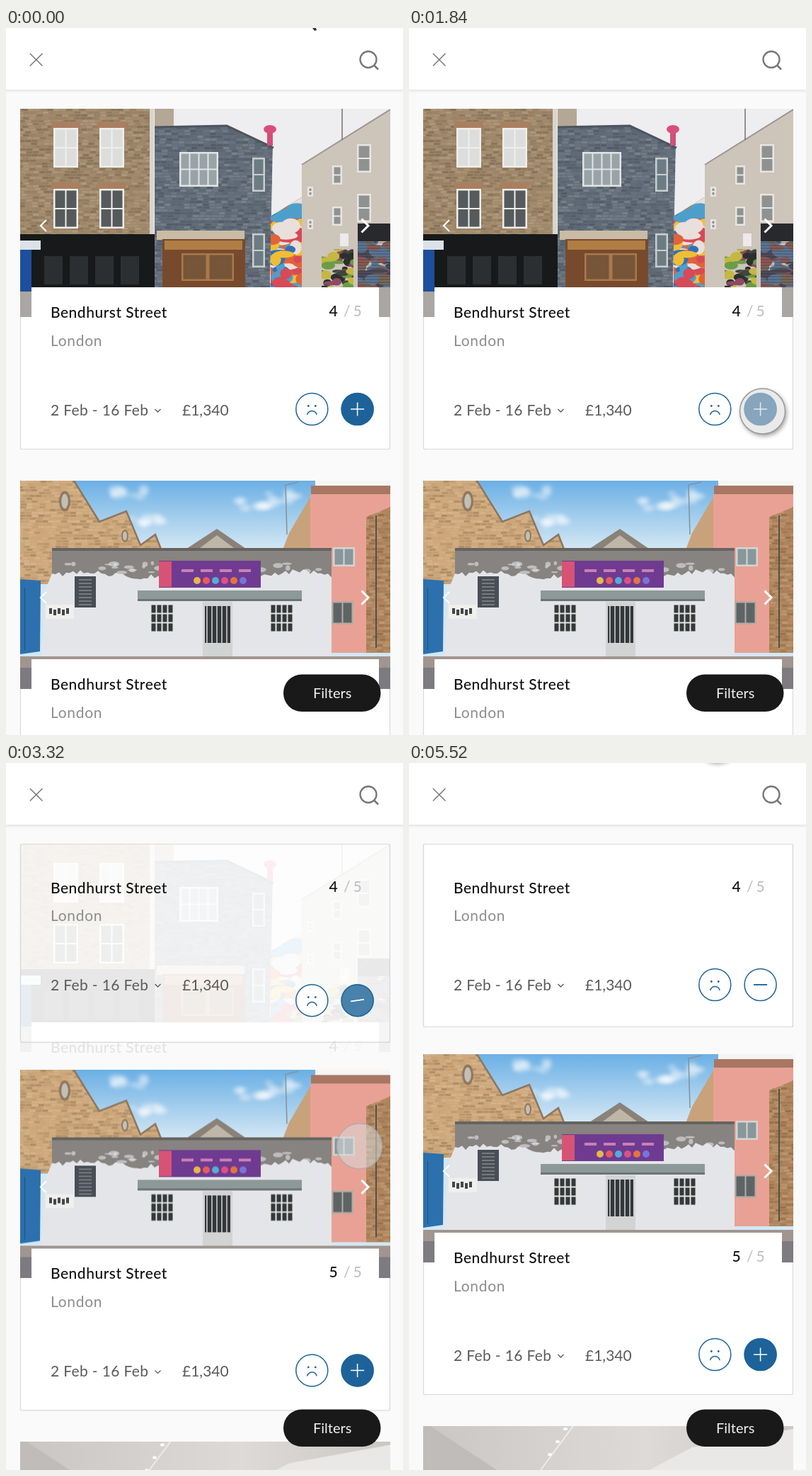
Animation, 561 px wide and 998 px high, one loop 5800 ms. Source, as an HTML page with a canvas:

```html
<!DOCTYPE html>
<html lang="en">
<head>
<meta charset="utf-8">
<title>Space listings</title>
<style>
html, body { margin: 0; width: 100%; height: 100%; overflow: hidden; background: #fafafa; }
canvas { display: block; width: 100vw; height: 100vh; }
</style>
</head>
<body>
<canvas id="stage" width="561" height="998"></canvas>
<script>
const LOOP = 5800, STEP = 40, W = 561, H = 998;
const LEFT = 20, WIDTH = 523, PHOTO_H = 294, CARD_H = 481, PITCH = 525, TOP = 114;
const PAGE = '#fafafa', EDGE = '#d9d9d9', BLUE = '#1d6399';
const DARK = '#111', GREY = '#8d8d8d', PALE = '#bdbdbd', TEXT = '#5a5a5a';
const PLACE = 'Bendhurst Street';
const ctx = document.getElementById('stage').getContext('2d');

const clamp = v => Math.max(0, Math.min(1, v));
const mix = (a, b, p) => a + (b - a) * p;
const span = (t, from, to) => clamp((t - from) / (to - from));
const easeOut = (p, n) => 1 - (1 - p) ** n;

function random(seed) {
  return () => (seed = (seed * 16807) % 2147483647) / 2147483647;
}

// ---------- drawing helpers ----------
function box(g, color, x, y, w, h) {
  g.fillStyle = color;
  g.fillRect(x, y, w, h);
}

function trace(g, points) {
  g.beginPath();
  for (let i = 0; i < points.length; i += 2) g.lineTo(points[i], points[i + 1]);
}

function poly(g, color, ...points) {
  trace(g, points);
  g.fillStyle = color;
  g.fill();
}

function line(g, color, width, ...points) {
  trace(g, points);
  g.strokeStyle = color;
  g.lineWidth = width;
  g.stroke();
}

function oval(g, color, x, y, rx, ry = rx) {
  g.beginPath();
  g.ellipse(x, y, rx, ry, 0, 0, Math.PI * 2);
  g.fillStyle = color;
  g.fill();
}

function ring(g, color, width, x, y, r) {
  g.beginPath();
  g.arc(x, y, r, 0, Math.PI * 2);
  g.strokeStyle = color;
  g.lineWidth = width;
  g.stroke();
}

// Fills a shape, then shades it with random bricks.
function brickwork(g, color, ...points) {
  const rnd = random(points.length * 97), [x0, y0] = points;
  g.save();
  trace(g, points);
  g.clip();
  g.fillStyle = color;
  g.fill();
  for (let y = y0 - 40; y < y0 + 260; y += 4)
    for (let x = x0 - rnd() * 9; x < x0 + 230; x += 9) {
      const tone = rnd() < 0.5 ? '0,0,0' : '255,245,225';
      box(g, `rgba(${tone},${rnd() * 0.16})`, x, y, 8, 3);
    }
  g.restore();
}

// Random splashes of paint inside a shape.
function mural(g, seed, colors, size, ...points) {
  const rnd = random(seed), [x0, y0] = points;
  g.save();
  trace(g, points);
  g.clip();
  for (let i = 0; i < 160; i++)
    oval(g, colors[i % colors.length], x0 + rnd() * 60, y0 - 30 + rnd() * 140,
      size * (0.4 + rnd()), size * (0.3 + rnd() / 2));
  g.restore();
}

function pane(g, frame, glass, x, y, w, h, cols, rows) {
  box(g, frame, x, y, w, h);
  const cw = (w - 3) / cols, rh = (h - 3) / rows;
  for (let c = 0; c < cols; c++)
    for (let r = 0; r < rows; r++)
      box(g, glass, x + 2.5 + c * cw, y + 2.5 + r * rh, cw - 2, rh - 2);
}

// Cached picture, drawn in stage coordinates; the caption panel cuts into its foot.
function picture(top, draw) {
  const c = document.createElement('canvas');
  c.width = WIDTH;
  c.height = PHOTO_H;
  const g = c.getContext('2d');
  g.translate(-LEFT, -top);
  draw(g);
  box(g, '#fff', 36, top + 252, 491, 60);
  return c;
}

// ---------- pictures ----------
const terrace = picture(TOP, g => {
  box(g, '#eeedef', LEFT, TOP, WIDTH, PHOTO_H);
  box(g, '#aaa6a3', LEFT, 360, WIDTH, 48);

  // brick house and dark shopfront
  brickwork(g, '#9f8769', 20, 114, 205, 114, 205, 300, 20, 300);
  box(g, '#d9d5cd', 203, 114, 6, 190);
  for (const x of [67, 132])
    for (const [y, glass] of [[141, '#dcdedd'], [227, '#555a5c']]) {
      box(g, '#a97f60', x - 3, y - 9, 41, 9);
      pane(g, '#f0eeea', glass, x, y, 35, 56, 2, 2);
    }
  box(g, '#17191a', 20, 291, 190, 75);
  for (let i = 0; i < 4; i++) box(g, '#2b2f31', 54 + i * 36, 322, 26, 40);
  box(g, '#1d4f9c', 20, 308, 16, 64);
  box(g, '#dbe2e8', 20, 300, 29, 13);

  // painted corner building
  box(g, '#b5a796', 210, 114, 27, 30);
  brickwork(g, '#616c79', 210, 140, 312, 138, 377, 169, 373, 366, 210, 366);
  line(g, '#4b545e', 3, 210, 140, 312, 138, 378, 169);
  pane(g, '#e2e4e3', '#98a3a8', 245, 175, 55, 49, 4, 2);
  for (const y of [183, 290]) pane(g, '#c9cecf', '#6d7b83', 348, y, 18, 48, 1, 2);
  box(g, '#cabba6', 213, 286, 124, 13);
  box(g, '#774a2d', 221, 298, 117, 68);
  box(g, '#b07d44', 224, 300, 110, 13);
  for (const x of [248, 285]) pane(g, '#a9794c', '#765538', x, 318, 37, 39, 1, 1);
  box(g, '#d0507a', 369, 144, 8, 22);
  oval(g, '#d94f79', 373, 143, 9, 6);

  // lane with murals
  poly(g, '#cdc4ba', 418, 193, 543, 115, 543, 366, 418, 366);
  line(g, '#9c958f', 2, 418, 193, 543, 115);
  line(g, '#77716d', 1.5, 475, 114, 475, 158);
  for (let i = 0; i < 3; i++)
    for (let row = 0; row < 2; row++)
      pane(g, '#e8e6e2', '#8e9391', 426 + i * 35, 224 - i * 30 + row * (46 + i * 12), 8 + i * 6, 14 + i * 13, 1, 2);
  mural(g, 5, ['#4d9fcb', '#f0be35', '#e0643a', '#e9dfdb', '#356fb4', '#d74a57'], 14,
    374, 266, 418, 239, 418, 366, 374, 366);
  mural(g, 11, ['#3f453f', '#6c9c45', '#2c302c', '#c4b83f', '#8d4a62'], 8,
    446, 312, 491, 312, 491, 366, 446, 366);
  mural(g, 17, ['#4e4a59', '#5b7593', '#8a5a55', '#75695a'], 11,
    497, 301, 543, 301, 543, 366, 497, 366);
  for (let y = 303; y < 366; y += 4) line(g, 'rgba(25,25,35,.4)', 1, 497, y, 543, y);
  box(g, '#28292c', 497, 276, 46, 25);
  box(g, '#eceaea', 472, 290, 12, 18);
});

const shop = picture(TOP + PITCH, g => {
  const sky = g.createLinearGradient(0, 639, 0, 735);
  sky.addColorStop(0, '#6bb0e5');
  sky.addColorStop(1, '#d3e7f4');
  box(g, sky, LEFT, 639, WIDTH, PHOTO_H);
  const rnd = random(12);
  g.save();
  g.filter = 'blur(3px)';
  for (let i = 0; i < 30; i++) {
    const x = [175, 200, 346, 384][i % 4], y = [657, 696, 671, 662][i % 4];
    oval(g, 'rgba(255,255,255,.5)', x + (rnd() - 0.5) * 44, y + (rnd() - 0.5) * 14, 5 + rnd() * 9, 2 + rnd() * 4);
  }
  g.restore();

  // brick gables
  const ridge = [96, 639, 132, 697, 170, 682, 190, 730, 211, 715, 220, 738];
  brickwork(g, '#cda77a', 20, 639, ...ridge, 65, 785, 20, 785);
  line(g, '#8e755f', 2.5, ...ridge);
  for (const [x, y, r] of [[83, 668, 8], [168, 717, 5]]) {
    oval(g, '#91785f', x, y, r, r * 1.8);
    oval(g, '#c2bfb6', x, y, r * 0.6, r * 1.3);
  }
  poly(g, '#8a8278', 252, 737, 298, 707, 342, 737);
  poly(g, '#bfb6a8', 274, 734, 298, 716, 322, 734);

  // pink house
  line(g, '#859099', 1.5, 413, 641, 395, 645, 397, 715);
  poly(g, '#c8a27a', 390, 739, 400, 713, 434, 655, 434, 739);
  poly(g, '#e9a195', 430, 658, 543, 656, 543, 882, 458, 882, 430, 738);
  box(g, '#f7f4f2', 437, 639, 106, 7);
  box(g, '#a87662', 431, 646, 112, 12);
  brickwork(g, '#b0865c', 509, 690, 543, 676, 543, 882, 509, 882);
  line(g, '#55504c', 2, 523, 688, 523, 875);
  pane(g, '#d5d5d3', '#87979b', 462, 733, 31, 27, 2, 1);
  pane(g, '#b8aaa4', '#5d6465', 460, 809, 31, 33, 2, 1);

  // shop wall with flaking paint
  box(g, '#868380', 65, 734, 395, 50);
  box(g, '#656361', 65, 734, 395, 4);
  const flakes = [];
  for (let x = 65; x <= 460; x += 5) flakes.push(x, 768 + Math.sin(x / 24) * 4 + rnd() * 7);
  poly(g, '#e4e5e9', 50, 888, 56, 792, ...flakes, 460, 888);
  for (let i = 0; i < 40; i++)
    oval(g, 'rgba(228,228,231,.6)', 72 + rnd() * 380, 755 + rnd() * 14, 2 + rnd() * 6, 1 + rnd() * 3);
  poly(g, '#2c70ae', 20, 778, 49, 780, 48, 880, 20, 884);
  box(g, '#204f7e', 26, 790, 1, 88);

  // banner and notices
  box(g, '#6e3b91', 216, 752, 144, 38);
  box(g, '#d75375', 216, 753, 18, 36);
  ['#e8b74b', '#e95a62', '#53afd1', '#df4f87', '#e4743e', '#7b73d8'].forEach((c, i) =>
    oval(g, c, 270 + i * 13, 780, 5));
  for (let i = 0; i < 4; i++) box(g, '#cb7fb4', 248 + i * 27, 764, 17, 4);
  box(g, '#484d56', 97, 774, 30, 44);
  for (let y = 779; y < 815; y += 5) line(g, '#a4a9ad', 1, 103, y, 121, y);
  box(g, '#f0efeb', 56, 814, 40, 20);
  for (let i = 0; i < 5; i++) box(g, '#42474a', 61 + i * 6, 819 + (i % 2) * 2, 4, 8);

  // canopy, windows and door
  box(g, '#8d9998', 186, 794, 232, 14);
  box(g, '#6a7574', 186, 806, 232, 3);
  for (const x of [203, 372]) pane(g, '#e4e5e2', '#34393b', x, 812, 35, 42, 4, 3);
  box(g, '#d2d3d3', 278, 810, 42, 78);
  box(g, '#33373a', 281, 816, 36, 52);
  for (let x = 284; x < 318; x += 7) line(g, '#d9dad9', 1.5, x, 816, x, 869);

  box(g, '#a0958f', LEFT, 887, WIDTH, 16);
  box(g, '#7d7b80', LEFT, 903, WIDTH, 30);
});

const room = picture(TOP + PITCH, g => {
  const y = TOP + PITCH, wall = g.createLinearGradient(LEFT, 0, LEFT + WIDTH, 0);
  wall.addColorStop(0, '#c9c6c3');
  wall.addColorStop(0.6, '#dddad7');
  wall.addColorStop(1, '#cac7c4');
  box(g, wall, LEFT, y, WIDTH, PHOTO_H);
  poly(g, '#bfbcb9', 20, y, 30, y, 124, y + 62, 20, y + 62);
  line(g, '#efedeb', 2, 232, y, 186, y + 62);
  poly(g, '#eae8e6', 340, y + 62, 400, y + 30, 543, y + 4, 543, y + 62);
  for (let i = 0; i < 3; i++) oval(g, '#fff', 221 - i * 11, y + 4 + i * 18, 3, 2);
});

// ---------- interface ----------
function text(s, x, y, color, size = 21, spacing = 0, weight = 400) {
  ctx.font = `${weight} ${size}px Lato, "Open Sans", sans-serif`;
  ctx.letterSpacing = spacing + 'px';
  ctx.fillStyle = color;
  ctx.fillText(s, x, y);
}

function faded(alpha, draw) {
  if (alpha <= 0) return;
  ctx.save();
  ctx.globalAlpha = alpha;
  draw();
  ctx.restore();
}

function frame(top, height, fill) {
  ctx.beginPath();
  ctx.roundRect(LEFT + 0.5, top + 0.5, WIDTH - 1, height - 1, 2);
  ctx.fillStyle = fill;
  ctx.fill();
  ctx.strokeStyle = EDGE;
  ctx.lineWidth = 1.2;
  ctx.stroke();
}

function heading(n, title, city) {
  text(PLACE, 63, title, DARK, 21, 0.5, 500);
  text(n, 456.5, title - 2, DARK, 21, 0, 500);
  text('/', 477, title - 2, PALE);
  text('5', 490.5, title - 2, PALE);
  text('London', 63, city, GREY, 21, 0.7);
}

function booking(y) {
  text('2 Feb - 16 Feb', 63, y, TEXT, 21, 0.35);
  text('£1,340', 249, y, TEXT);
  line(ctx, TEXT, 1.3, 210.5, y - 9, 214.5, y - 5, 218.5, y - 9);
}

function chevron(x, y, dir, size, width) {
  line(ctx, '#fff', width, x - dir * size, y - size, x, y, x - dir * size, y + size);
}

function photoCard(image, top, n) {
  ctx.drawImage(image, LEFT, top);
  chevron(49, top + 165, -1, 8, 2.2);
  chevron(512, top + 165, 1, 9.5, 3);
  heading(n, top + 294.5, top + 335);
  booking(top + 433);
}

function sadFace(y) {
  const x = 432.3;
  oval(ctx, '#fff', x, y, 22.5);
  ring(ctx, BLUE, 1.5, x, y, 22.5);
  for (const side of [-5, 5]) oval(ctx, BLUE, x + side, y - 4.5, 1.4);
  ctx.beginPath();
  ctx.arc(x, y + 9.5, 7, Math.PI * 1.07, Math.PI * 1.93);
  ctx.stroke();
}

// p: plus to minus; fill: strength of the blue disc
function toggle(y, p, fill) {
  const x = 496.6;
  oval(ctx, '#fff', x, y, 22.5);
  faded(fill, () => oval(ctx, BLUE, x, y, 23));
  ring(ctx, BLUE, 1.5, x, y, 22.5);
  for (const angle of [Math.PI / 2 * (1 + p), -0.45 * Math.sin(Math.PI * p)]) {
    const dx = Math.cos(angle) * 9.5, dy = Math.sin(angle) * 9.5;
    line(ctx, fill > 0.5 ? '#fff' : BLUE, 1.5, x - dx, y - dy, x + dx, y + dy);
  }
}

function header() {
  ctx.save();
  ctx.shadowColor = 'rgba(0,0,0,.13)';
  ctx.shadowBlur = 5;
  ctx.shadowOffsetY = 1;
  box(ctx, '#fff', -10, -10, W + 20, 97);
  ctx.restore();
  for (const d of [-8.8, 8.8]) line(ctx, '#777', 1.5, 42.7 - d, 36, 42.7 + d, 53.5);
  ring(ctx, '#777', 2.3, 512, 44.5, 11.5);
  line(ctx, '#777', 2.5, 520, 52.5, 526, 58.5);
}

function filters() {
  ctx.beginPath();
  ctx.roundRect(392, 912.5, 137.5, 52.5, 26);
  ctx.fillStyle = '#191919';
  ctx.fill();
  text('Filters', 434, 945.5, '#f2f2f2', 20);
}

// ---------- pointer ----------
const ENTRY = [434, -42], WAIT = [486, 251], ADD = [499.5, 541], REMOVE = [494, 316.5], EXIT = [434, -34];
const moves = [
  { from: 700, to: 960, a: ENTRY, via: [478, 130], b: WAIT },
  { from: 1180, to: 1800, a: WAIT, via: [309, 457], b: ADD },
  { from: 3740, to: 4320, a: ADD, via: [512, 440], b: REMOVE },
  { from: 4900, to: 5520, a: REMOVE, via: [474, 130], b: EXIT }
];

function pointerAt(t) {
  const m = moves.filter(move => t >= move.from).pop();
  const u = easeOut(span(t, m.from, m.to), 2), v = 1 - u;
  return [0, 1].map(i => m.a[i] * v * v + 2 * m.via[i] * u * v + m.b[i] * u * u);
}

function pointer(t) {
  if (t < 440) {
    const x = t < 400 ? 433 : 439;
    poly(ctx, '#333', x, 0, x + 5, 0, x + 6, 3, x + 3, 4);
  }
  if (t < moves[0].from) return;
  const [x, y] = pointerAt(t);
  const held = t >= 3120 && t < 3760;
  if (!held) {
    // shadow only outside the disc
    ctx.save();
    ctx.beginPath();
    ctx.rect(0, 0, W, H);
    ctx.arc(x, y, 32.5, 0, Math.PI * 2);
    ctx.clip('evenodd');
    ctx.shadowColor = 'rgba(0,0,0,.4)';
    ctx.shadowBlur = 6;
    ctx.shadowOffsetX = 2;
    ctx.shadowOffsetY = 3;
    oval(ctx, '#bbb', x, y, 32);
    ctx.restore();
  }
  oval(ctx, 'rgba(218,218,218,.56)', x, y, 32.5);
  ring(ctx, held ? 'rgba(165,160,160,.65)' : 'rgba(145,145,145,.9)', 1.5, x, y, 32);
}

// ---------- scene ----------
function render(t) {
  const time = span(t, 3100, 3600), p = easeOut(time, 4);
  box(ctx, PAGE, 0, 0, W, H);

  const height = mix(CARD_H, 259, p);
  frame(TOP, height, '#fff');
  faded(1 - p, () => photoCard(terrace, TOP, '4'));
  faded(Math.min(1, p * 1.25), () => {
    frame(TOP, height, 'transparent');
    heading('4', 183.5, 223);
    booking(321);
  });
  const icons = mix(538, 313, p);
  sadFace(icons);
  toggle(icons, p, 1 - time * time);

  const second = mix(TOP + PITCH, 411, p);
  box(ctx, PAGE, 0, second - 2, W, H);
  frame(second, CARD_H, '#fff');
  photoCard(shop, second, '5');
  sadFace(second + 424);
  toggle(second + 424, 0, 1);
  ctx.drawImage(room, LEFT, second + PITCH);

  header();
  filters();
  pointer(t);
}

const start = performance.now();
function tick() {
  const t = (performance.now() - start) % LOOP;
  render(Math.floor(t / STEP) * STEP);
  requestAnimationFrame(tick);
}
tick();
</script>
</body>
</html>
```
